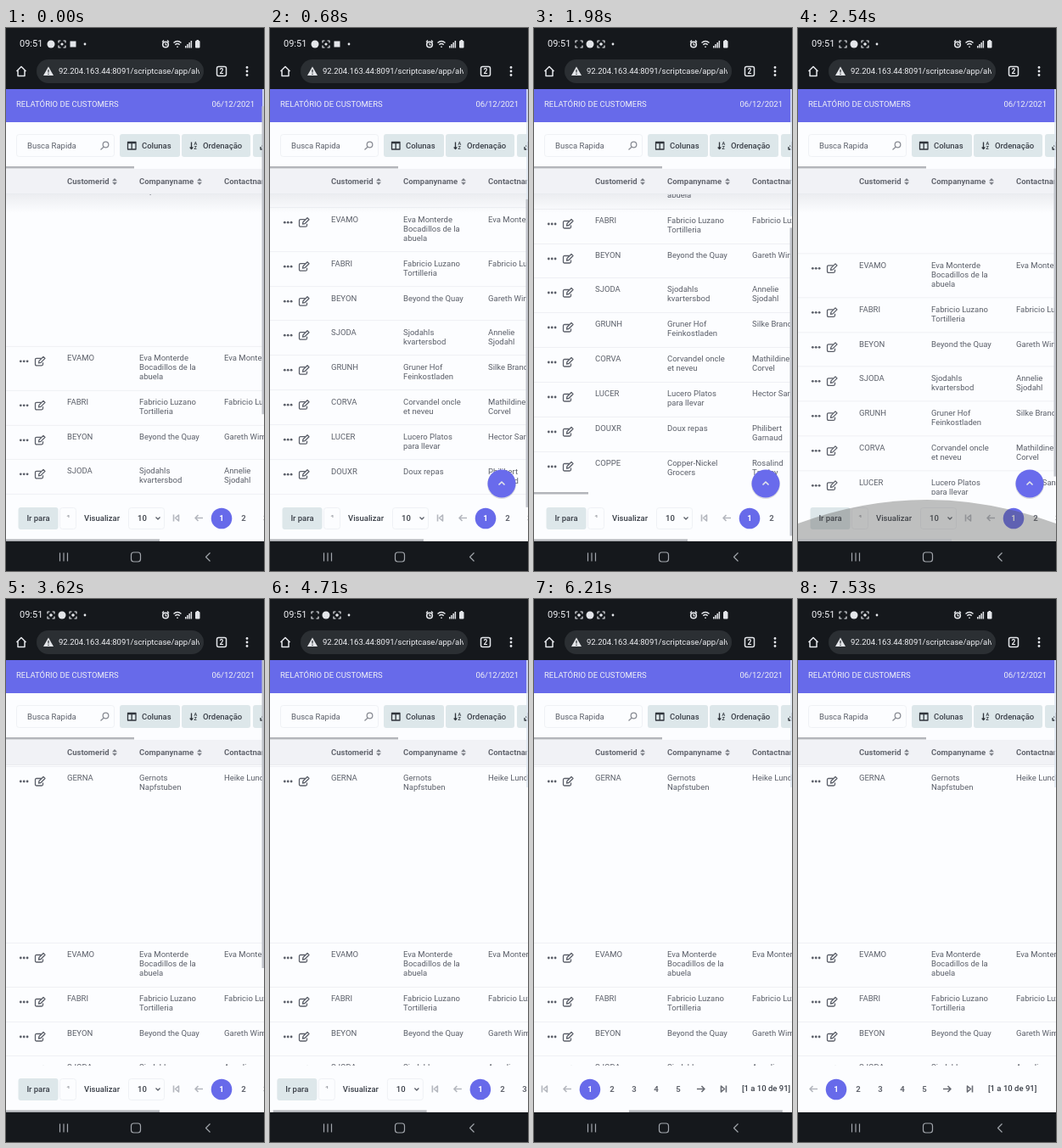
These frames come from a looping animation (304 px wide and 640 px high, 7.55 s). An HTML page:

```html
<!DOCTYPE html>
<html lang="pt">
<head>
<meta charset="utf-8">
<title>Relatório</title>
<style>
html, body { margin: 0; width: 100%; height: 100%; overflow: hidden; background: #fcfdff; }
svg { display: block; width: 304px; height: 640px; }
text { font: 9.5px Roboto, Arial, sans-serif; fill: #5b5f69; white-space: pre; }
.b { font-weight: 700; fill: #63666f; }
.m { font-weight: 500; fill: #3a3f48; }
.w { fill: #f0f1f5; }
.line { fill: none; stroke: #5b5f69; stroke-width: 1.3; stroke-linejoin: round; }
.ink { stroke: #30353c; }
.light { fill: none; stroke: #e4e6ea; stroke-width: 1.2; stroke-linejoin: round; }
.nav { stroke: #a2a6ac; }
.box { fill: #fcfdff; stroke: #eff1f5; }
.btn { fill: #dde7ea; }
.bar { fill: #b3b5ba; }
</style>
</head>
<body>
<svg viewBox="0 0 304 640" xmlns="http://www.w3.org/2000/svg">
  <defs>
    <clipPath id="tableClip"><path d="M0 196H304V550H0Z"/></clipPath>
    <clipPath id="urlClip"><path d="M60 37H228V65H60Z"/></clipPath>
    <clipPath id="inputClip"><path d="M64 566H82V577H64Z"/></clipPath>
    <linearGradient id="fade" x2="0" y2="1">
      <stop stop-color="#5b6070" stop-opacity=".1"/>
      <stop offset="1" stop-color="#5b6070" stop-opacity="0"/>
    </linearGradient>
    <g id="edit" class="line">
      <path d="M7 -3.5H1.5Q0 -3.5 0 -2V3.5Q0 5 1.5 5H7.5Q9 5 9 3.5V1.5"/>
      <path d="M4 2L4.5 -.5L9.5 -5.5L11.5 -3.5L6.5 1.5Z"/>
    </g>
    <g id="sort" fill="#7d8088"><path d="M-3 -.7L0 -4L3 -.7ZM-3 .7L0 4L3 .7Z"/></g>
    <g id="capture" class="light">
      <path d="M-4 -1.5V-4H-1.5M1.5 -4H4V-1.5M4 1.5V4H1.5M-1.5 4H-4V1.5"/>
    </g>
  </defs>
  <rect width="304" height="640" fill="#fcfdff"/>

  <g clip-path="url(#tableClip)"><g id="rows"></g></g>
  <rect id="shade" y="196" width="304" height="22" fill="url(#fade)"/>

  <g id="top"></g>
  <g id="pager"></g>

  <g id="toTop">
    <circle cx="273" cy="538" r="17" fill="#50536a" opacity=".2"/>
    <circle cx="273" cy="537" r="16.5" fill="#696bec"/>
    <path class="light" d="M269.5 538.5L273 535L276.5 538.5" style="stroke-width:1.6"/>
  </g>
  <path id="glow" d="M0 584Q152 528 304 584V605H0Z" fill="#50514f"/>
  <rect id="hBar" class="bar" y="602.5" width="181" height="2.5"/>
  <rect x="302" y="72" width="2" height="150" fill="#dfe8f2" opacity=".8"/>
  <rect id="vBar" x="301.5" width="2.5" height="363" fill="#c0c3ca"/>
  <g id="system"></g>
</svg>
<script>
const LOOP = 7550;
const el = id => document.getElementById(id);
const text = (x, y, s, cls = '', extra = '') =>
  `<text x="${x}" y="${y + 3.4}" class="${cls}" ${extra}>${s}</text>`;
const lines = (x, y, s) => s.split('|').map((part, i) => text(x, y + 11 * i, part)).join('');
const rect = (x, y, w, h, attrs) => `<rect x="${x}" y="${y}" width="${w}" height="${h}" ${attrs}/>`;
const path = (d, attrs = 'class="line"') => `<path d="${d}" ${attrs}/>`;
const use = (id, x, y) => `<use href="#${id}" transform="translate(${x} ${y})"/>`;
const dots = (x, y, r, dx, dy, fill) => [0, 1, 2].map(i =>
  `<circle cx="${x + i * dx}" cy="${y + i * dy}" r="${r}" fill="${fill}"/>`).join('');
const middle = 'text-anchor="middle"';

// y, code, company, contact
const customers = [
  [211, 'GERNA', 'Gernots|Napfstuben', 'Heike Lundtmann'],
  [419, 'EVAMO', 'Eva Monterde|Bocadillos de la|abuela', 'Eva Monterde'],
  [471, 'FABRI', 'Fabricio Luzano|Tortilleria', 'Fabricio Luzano'],
  [512, 'BEYON', 'Beyond the Quay', 'Gareth Wimslow'],
  [552, 'SJODA', 'Sjodahls|kvartersbod', 'Annelie|Sjodahl'],
  [593, 'GRUNH', 'Gruner Hof|Feinkostladen', 'Silke Brandtner'],
  [634, 'CORVA', 'Corvandel oncle|et neveu', 'Mathildine|Corvel'],
  [675, 'LUCER', 'Lucero Platos|para llevar', 'Hector Sanzuela'],
  [716, 'DOUXR', 'Doux repas', 'Philibert|Garnaud'],
  [757, 'COPPE', 'Copper-Nickel|Grocers', 'Rosalind|Tarnley']
];

el('rows').innerHTML = customers.map(([y, code, company, contact]) =>
  rect(0, y - 14, 304, 1, 'fill="#eff0f4"') +
  dots(17.3, y + 4, 1.4, 3.9, 0, '#5b5f69') + use('edit', 34.5, y + 4) +
  text(72, y, code) + lines(157, y, company) + lines(257, y, contact)
).join('') + rect(0, 791, 64, 2.5, 'class="bar"');

el('top').innerHTML =
  rect(0, 72, 304, 39, 'fill="#676aea"') +
  text(12, 90, 'RELATÓRIO DE CUSTOMERS', 'w') +
  text(293, 90, '06/12/2021', 'w', 'text-anchor="end"') +
  rect(0, 111, 304, 55, 'fill="#fcfdff"') +
  rect(12.5, 125.5, 115, 26, 'rx="3" class="box"') +
  text(25, 139, 'Busca Rapida') +
  '<circle cx="117.5" cy="137.5" r="3.3" class="line" style="stroke:#8a8d95"/>' +
  path('M115 140.3L111.5 143.5', 'class="line" style="stroke:#8a8d95"') +
  [[134, 71], [207, 81], [291, 30]].map(([x, w]) => rect(x, 125, w, 27, 'rx="3" class="btn"')).join('') +
  path('M143.5 134.5H153V143H143.5ZM148.2 134V143M143.5 135.5H153', 'class="line ink"') +
  text(160, 138.5, 'Colunas', 'm') +
  path('M218.5 134.5V142M216.7 140.5L218.5 142.5L220.3 140.5', 'class="line ink"') +
  ['A', 'Z'].map((c, i) => text(221.5, 134.8 + 5 * i, c, 'b', 'style="font-size:5.5px;fill:#30353c"')).join('') +
  text(232, 138.5, 'Ordenação', 'm') +
  path('M300 140V143H310M304 134V141L301.5 138.5', 'class="line ink"') +
  rect(0, 166, 304, 30, 'fill="#f1f2f6"') + rect(0, 195, 304, 1, 'fill="#e9ebef"') +
  rect(0, 163, 151, 2.5, 'class="bar"') +
  text(72, 181, 'Customerid', 'b') + use('sort', 128, 181) +
  text(157, 181, 'Companyname', 'b') + use('sort', 228, 181) +
  text(257, 181, 'Contactname', 'b');

const pale = 'class="line" style="stroke:#b4b7be;stroke-width:1.6"';
const dark = 'class="line" style="stroke:#696c74;stroke-width:1.6"';
el('pager').innerHTML =
  rect(0, 550, 600, 55, 'fill="#fcfdff"') +
  rect(14.5, 565, 47, 26, 'rx="3" class="btn"') + text(38, 577.5, 'Ir para', 'm', middle) +
  rect(63.5, 565.5, 19, 25, 'rx="3" class="box"') +
  `<g clip-path="url(#inputClip)">${text(71, 577.5, '1', '', 'opacity=".7"')}</g>` +
  text(92, 577.5, 'Visualizar', 'm') +
  rect(144.5, 565.5, 42, 25, 'rx="3" class="box"') + text(155, 577.5, '10', 'm') +
  path('M176.5 576.5L179 579L181.5 576.5') +
  path('M197.5 573.5V581.5M203.5 574L199.5 577.5L203.5 581Z', pale) +
  path('M232 577.5H223M226.5 574L223 577.5L226.5 581', pale) +
  '<circle cx="254" cy="578" r="12.3" fill="#676aea"/>' +
  [1, 2, 3, 4, 5].map(n => text(228 + 26 * n, 577.5, n, n > 1 ? 'b' : 'b w', middle + (n > 1 ? '' : ' style="fill:#fff"'))).join('') +
  path('M380 577.5H389M385.5 574L389 577.5L385.5 581', dark) +
  path('M414.5 573.5V581.5M408.5 574L412.5 577.5L408.5 581Z', dark) +
  text(433, 577, '[1 a 10 de 91]', 'm');

const bright = 'fill="#e4e6ea"';
el('system').innerHTML =
  rect(0, 0, 304, 72, 'fill="#15181c"') + rect(0, 605, 304, 35, 'fill="#15181c"') +
  text(16, 18.5, '09:51', 'w', 'style="font-size:11px"') +
  `<g id="noticeA"><circle cx="53" cy="19" r="4.5" ${bright}/>${use('capture', 66, 19)}` +
  `<circle cx="66" cy="19" r="1.6" ${bright}/>${rect(75.5, 15.5, 7, 7, bright)}</g>` +
  `<g id="noticeB">${use('capture', 53, 19)}<circle id="blink" cx="53" cy="19" r="1.8" ${bright}/>` +
  `<circle cx="66" cy="19" r="4.5" ${bright}/>${use('capture', 79, 19)}<circle cx="79" cy="19" r="1.8" ${bright}/></g>` +
  `<circle cx="93" cy="19" r="1.4" ${bright}/>` +
  '<circle cx="188" cy="19.5" r="3.3" class="light" style="stroke-width:1.6"/>' +
  path('M188 17.5V19.8H189.8M184 16.5L186 14.5M192 16.5L190 14.5', 'class="light"') +
  path('M197.5 17.5Q202 13.5 206.5 17.5M199.3 19.7Q202 17.3 204.7 19.7M202 21.5V23', 'class="light" style="stroke-width:1.5"') +
  [0, 1, 2, 3].map(i => rect(211 + i * 2.2, 21 - i * 2, 1.5, 2.5 + i * 2, bright)).join('') +
  rect(223, 15, 5.5, 8.5, 'rx="1" ' + bright) + rect(224.5, 14, 2.5, 1.5, bright) +
  path('M12.5 51L18 45.5L23.5 51M14 50V56.5H22V50', 'class="light" style="stroke-width:1.5"') +
  rect(36, 37, 197, 28, 'rx="14" fill="#2b2f33"') +
  path('M50 45.5L56 56H44Z', bright) + path('M50 49V52.5M50 53.7V55', 'stroke="#2b2f33" stroke-width="1.2"') +
  `<g clip-path="url(#urlClip)">${text(62, 51, '92.204.163.44:8091/scriptcase/app/alv', 'w')}</g>` +
  rect(248.5, 45.5, 11, 11, 'rx="2" class="light" style="stroke-width:1.5"') +
  text(254, 51, '2', 'w', middle + ' style="font-size:8.5px;font-weight:700"') +
  dots(284, 46.5, 1.4, 0, 4.5, '#e4e6ea') +
  path('M63.5 618.5V628.5M68 618.5V628.5M72.5 618.5V628.5', 'class="light nav"') +
  rect(147.5, 618, 11, 11, 'rx="3" class="light nav"') +
  path('M240.5 618.5L235.5 623.5L240.5 628.5', 'class="light nav"');

// [ms, value] steps
const scrollY = [[0, 30], [200, 62], [400, 118], [600, 176], [800, 220], [1000, 240], [1120, 244],
  [2260, 244], [2400, 208], [2540, 140], [2700, 82], [2900, 32], [3080, 6], [3180, 0]];
const scrollX = [[4600, 0], [4710, 6], [4900, 32], [5150, 80], [5450, 134], [5800, 170],
  [6210, 188], [6400, 201], [6560, 209]];
const button = [[350, 0], [550, 1], [2750, 1], [2950, 0]];
const glow = [[2150, 0], [2350, .42], [2540, .36], [2850, 0]];
const vFade = [[3700, 1], [4000, 0]];
const hFade = [[6600, 1], [6900, 0]];

function at(steps, t) {
  const i = steps.findIndex(s => s[0] > t);
  if (i < 0) return steps[steps.length - 1][1];
  if (i === 0) return steps[0][1];
  const [t0, a] = steps[i - 1], [t1, b] = steps[i];
  return a + (b - a) * (t - t0) / (t1 - t0);
}

function draw(t) {
  const y = at(scrollY, t), x = at(scrollX, t);
  el('rows').setAttribute('transform', `translate(0 ${-y})`);
  el('pager').setAttribute('transform', `translate(${-x} 0)`);
  el('vBar').setAttribute('y', 72 + y * .67);
  el('hBar').setAttribute('x', x * .595);
  el('vBar').style.opacity = at(vFade, t);
  el('hBar').style.opacity = at(hFade, t);
  el('shade').style.opacity = Math.min(1, y / 20);
  el('toTop').style.opacity = at(button, t);
  el('glow').style.opacity = at(glow, t);
  const early = t < 740;
  el('noticeA').style.display = early ? '' : 'none';
  el('noticeB').style.display = early ? 'none' : '';
  el('blink').style.opacity = Math.cos((t - 1240) / 2450 * 2 * Math.PI) > 0 ? 1 : 0;
}

const start = performance.now();
function tick() {
  draw((performance.now() - start) % LOOP);
  requestAnimationFrame(tick);
}
tick();
</script>
</body>
</html>
```
